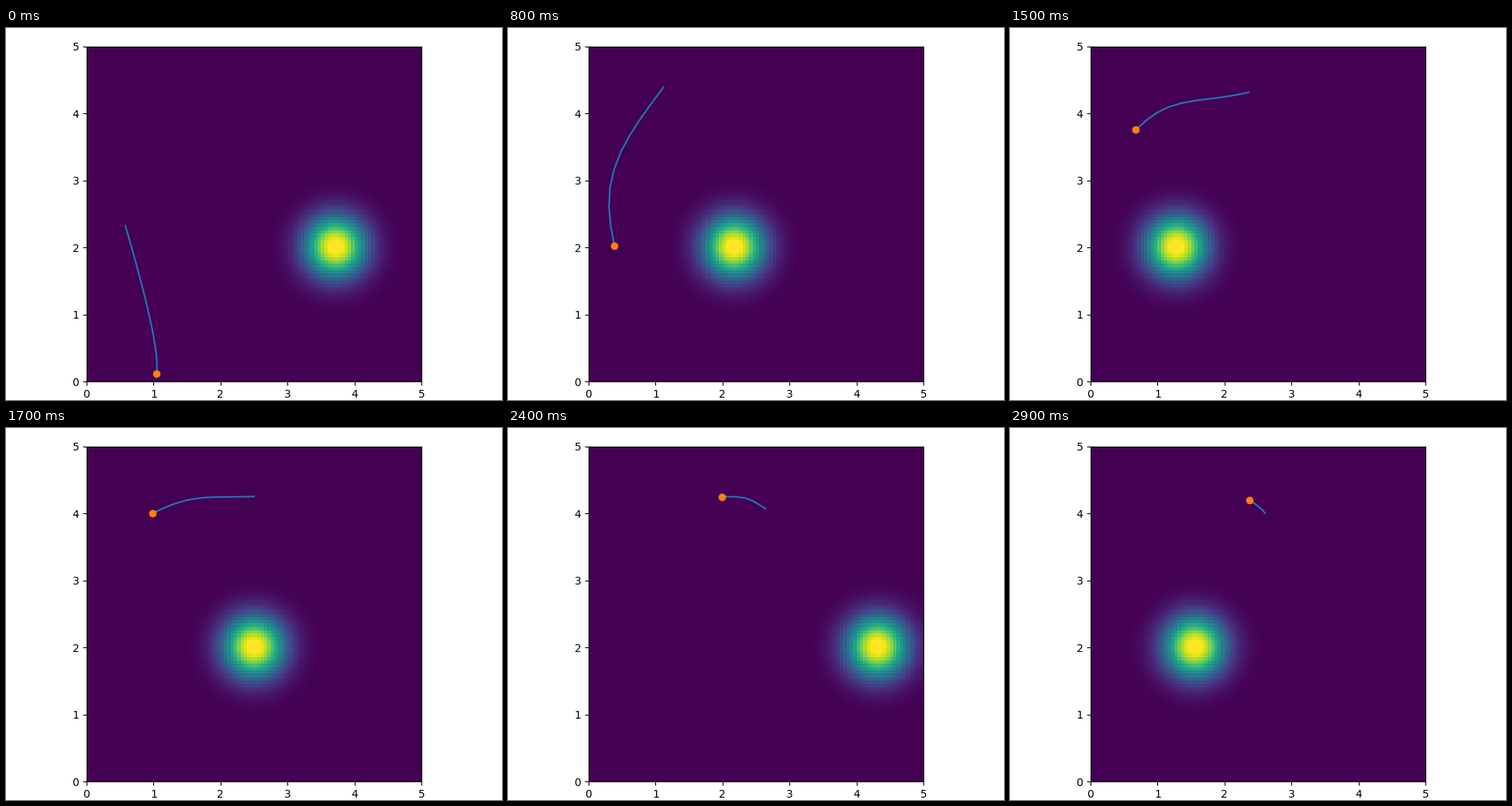
These frames come from a looping animation (640 by 480 pixels, 3 s). A matplotlib script:

```python
import numpy as np
import matplotlib.pyplot as plt
from matplotlib.animation import FuncAnimation

FRAMES, INTERVAL = 30, 100
SIZE, CELLS = 5, 100
STEPS = 9  # segments in the planned path

# Key points: time, ball x, y, plan end x, y.
KEYS = np.array([
    (0, 1.045, 0.110, 0.579, 2.326),
    (2, 1.025, 0.345, 0.150, 2.930),
    (4, 0.868, 0.842, 0.347, 3.530),
    (8, 0.385, 2.020, 1.117, 4.392),
    (12, 0.325, 3.150, 1.968, 4.410),
    (15, 0.677, 3.756, 2.361, 4.317),
    (20, 1.464, 4.196, 2.593, 4.167),
    (24, 1.985, 4.253, 2.639, 4.074),
    (29, 2.378, 4.196, 2.604, 4.005),
])
TIMES, POINTS = KEYS[:, 0], KEYS[:, 1:]
SLOPES = np.gradient(POINTS, TIMES, axis=0, edge_order=2)

grid = np.linspace(0, SIZE, CELLS)
X, Y = np.meshgrid(grid, grid)


def blob(i):
    """Gaussian hazard sweeping sideways, 20 samples per swing."""
    phase = np.linspace(0, 2 * np.pi, 20)[(i + 2) % 20]
    cx = 2.5 + 2 * np.sin(phase)
    return np.exp(-5 * ((X - cx) ** 2 + (Y - 2) ** 2))


def ends(t):
    """Ball and plan end at time t, by cubic Hermite between key points."""
    k = min(np.searchsorted(TIMES, t, side="right") - 1, len(TIMES) - 2)
    h = TIMES[k + 1] - TIMES[k]
    s = (t - TIMES[k]) / h
    p = ((1 + 2 * s) * (1 - s) ** 2 * POINTS[k]
         + s * (1 - s) ** 2 * h * SLOPES[k]
         + s * s * (3 - 2 * s) * POINTS[k + 1]
         + s * s * (s - 1) * h * SLOPES[k + 1])
    return p[:2], p[2:]


def half_curve(point, slope, u):
    """Quintic Hermite part of one end, without curvature there."""
    place = 1 - 10 * u**3 + 15 * u**4 - 6 * u**5
    pull = u - 6 * u**3 + 8 * u**4 - 3 * u**5
    return np.outer(place, point) + np.outer(pull, slope)


def plan(i):
    """Leave along the ball's motion, arrive turning right and slowing."""
    start, end = ends(i)
    leave = STEPS * (ends(i + 1)[0] - start)
    angle = np.radians(106 - 7 * i + 0.05 * i * i)
    speed = 3.54 * (1 - i / FRAMES)
    arrive = speed * np.array([np.cos(angle), np.sin(angle)])
    u = np.linspace(0, 1, STEPS + 1)
    return half_curve(start, leave, u) + half_curve(end, -arrive, 1 - u)


fig = plt.figure(figsize=(6.4, 4.8), dpi=100)
ax = fig.add_axes([0.1625, 0.05, 0.675, 0.9])
image = ax.imshow(blob(0), origin="lower", extent=(0, SIZE, 0, SIZE),
                  cmap="viridis", vmin=0, vmax=0.95)
trail, = ax.plot([], [])
ball, = ax.plot([], [], "o")
ax.set(xlim=(0, SIZE), ylim=(0, SIZE),
       xticks=range(SIZE + 1), yticks=range(SIZE + 1))


def update(i):
    path = plan(i)
    image.set_data(blob(i))
    trail.set_data(path[:, 0], path[:, 1])
    ball.set_data(path[:1, 0], path[:1, 1])
    return image, trail, ball


anim = FuncAnimation(fig, update, frames=FRAMES, interval=INTERVAL,
                     repeat=True, repeat_delay=0)
plt.show()
```
